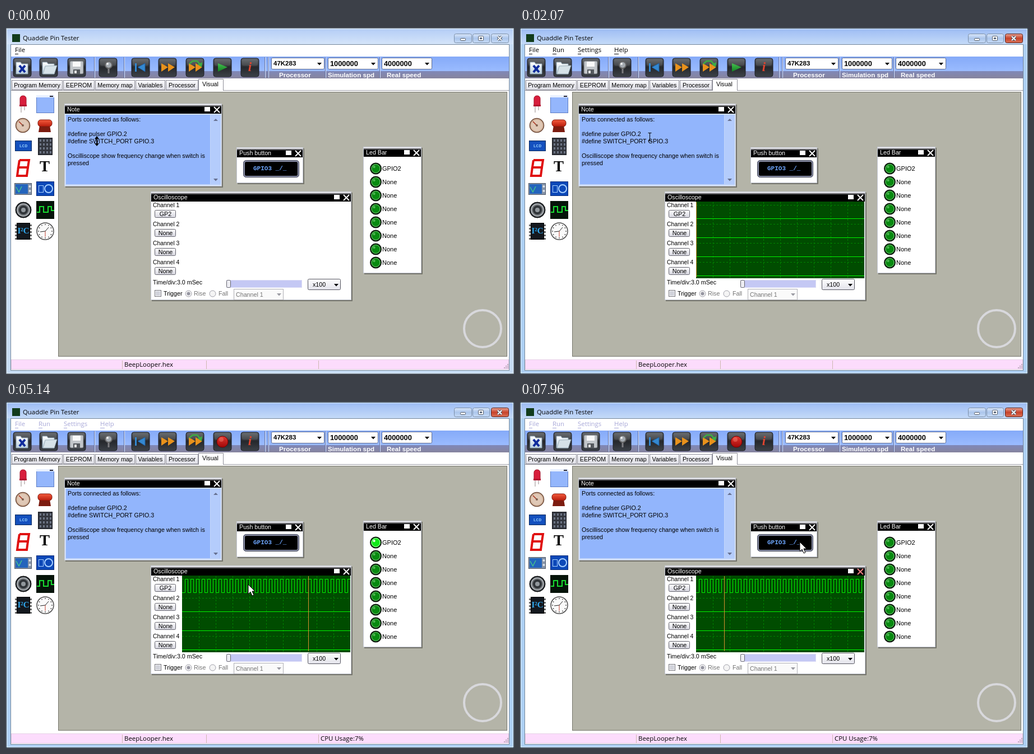
Recreate the animation shown at these times as an HTML page with a canvas. Size 906 by 618 pixels, loop 8000 ms.

```html
<!DOCTYPE html>
<html lang="en">
<head>
<meta charset="utf-8">
<title>Simulator session</title>
<style>
html, body { margin: 0; width: 100%; height: 100%; overflow: hidden; }
canvas { display: block; }
</style>
</head>
<body>
<canvas id="stage" width="906" height="618"></canvas>
<script>
const c = document.getElementById('stage').getContext('2d');
const LOOP = 8000;
const SANS = '10.7px "Liberation Sans", sans-serif';
const UI = '11.4px "Open Sans", sans-serif';
const BOLD = 'bold 11.6px "Liberation Sans", sans-serif';

// Pointer path: time, x, y
const POINTER = [
  [0, 162, 202], [520, 162, 202], [760, 113, 187], [1890, 113, 187], [2220, 320, 200],
  [2450, 300, 246], [2680, 212, 248], [2740, 212, 248], [3100, 388, 98], [3340, 389, 72],
  [3870, 389, 72], [4360, 484, 88], [4540, 666, 185], [4700, 640, 220], [5140, 432, 326],
  [5450, 470, 322], [5900, 605, 298], [6380, 500, 262], [6860, 474, 256], [7290, 474, 256], [7960, 499, 250]
];
// Oscilloscope sweep: time, refresh count
const SWEEP = [[3870, 0], [4360, 13], [5140, 33], [6860, 65], [7960, 86]];
const RUN_AT = 3870;

function sample(keys, t, ease) {
  let i = 1;
  while (i < keys.length - 1 && t > keys[i][0]) i++;
  const a = keys[i - 1], b = keys[i];
  let u = Math.min(1, Math.max(0, (t - a[0]) / (b[0] - a[0])));
  if (ease) u = u * u * (3 - 2 * u);
  return a.slice(1).map((v, k) => v + (b[k + 1] - v) * u);
}

function rect(x, y, w, h, fill, stroke) {
  if (fill) { c.fillStyle = fill; c.fillRect(x, y, w, h); }
  if (stroke) { c.strokeStyle = stroke; c.lineWidth = 1; c.strokeRect(x + .5, y + .5, w - 1, h - 1); }
}
function round(x, y, w, h, r, fill, stroke, width = 1) {
  c.beginPath(); c.roundRect(x, y, w, h, r); paint(fill, stroke, width);
}
function paint(fill, stroke, width = 1) {
  if (fill) { c.fillStyle = fill; c.fill(); }
  if (stroke) { c.strokeStyle = stroke; c.lineWidth = width; c.stroke(); }
}
function disc(x, y, r, fill, stroke, width) {
  c.beginPath(); c.arc(x, y, r, 0, 7); paint(fill, stroke, width);
}
function poly(points, fill, stroke, width) {
  c.beginPath();
  for (let i = 0; i < points.length; i += 2) c.lineTo(points[i], points[i + 1]);
  c.closePath(); paint(fill, stroke, width);
}
function line(points, stroke, width = 1, dash = []) {
  c.beginPath(); c.setLineDash(dash);
  for (let i = 0; i < points.length; i += 2) c.lineTo(points[i], points[i + 1]);
  paint(null, stroke, width); c.setLineDash([]);
}
function text(s, x, y, font = SANS, color = '#000', align = 'left') {
  c.font = font; c.fillStyle = color; c.textAlign = align; c.textBaseline = 'middle';
  c.fillText(s, x, y);
}
function fade(y0, y1, ...colors) {
  const g = c.createLinearGradient(0, y0, 0, y1);
  colors.forEach((k, i) => g.addColorStop(i / (colors.length - 1), k));
  return g;
}
const downArrow = (x, y, color) => poly([x - 4, y - 2, x + 4, y - 2, x, y + 2.5], color);
const play = (x, color, w = 12) => poly([x, 63, x + w, 70, x, 78], color);

function frame(t) {
  const active = t >= 1020;
  rect(0, 0, 906, 618, active ? '#aed0f4' : '#c6dcf4');
  rect(1, 1, 904, 28, fade(1, 29, active ? '#9dbcf4' : '#b4cdf6', active ? '#c4daf8' : '#d4e4f9'));
  rect(0, 0, 906, 618, null, active ? '#26384c' : '#707c8a');
  rect(1, 1, 904, 616, null, '#e4f2ff');
  rect(11, 11, 14, 14, '#123c1c');
  text('Quaddle Pin Tester', 30, 19, UI);
  [[799, 31], [832, 30], [865, 31]].forEach(([x, w], i) => {
    const red = i === 2 && active;
    round(x + .5, 10.5, w, 16, 3, red ? fade(10, 27, '#e9a99b', '#c8432a', '#d9745a') : fade(10, 27, '#dce8fa', '#acc6ec', '#c8dcf6'), red ? '#5a2018' : '#7b8fa8');
  });
  round(810.5, 18.5, 9, 4, 1, '#fff', '#4d5868');
  round(842.5, 14.5, 9, 8, 1, '#fff', '#4d5868');
  rect(845, 17, 4, 3, '#8fa4bd', '#4d5868');
  for (const [k, w] of [['#4d5868', 4], ['#fff', 2]]) {
    line([877, 15, 884, 22], k, w); line([884, 15, 877, 22], k, w);
  }

  rect(8, 29, 890, 583, '#fff', '#74869a');
  const menuColor = t >= RUN_AT ? '#a8a8d8' : '#000';
  [['File', 16, 6], ['Run', 58, 7], ['Settings', 103, 6], ['Help', 168, 8]].forEach(([s, x, w], i) => {
    if (i && t < 60) return;
    text(s, x, 40, UI, menuColor);
    rect(x, 46, w, 1, menuColor);
  });
  toolbar(t);
  tabs();
  palette();
  workspace(t);
  rect(9, 592, 888, 18, '#fcdcfc', '#e6d0e6');
  for (const x of [207, 357, 557]) rect(x, 594, 1, 15, '#cdb8b0');
  text('BeepLooper.hex', 211, 602, UI);
  if (t >= 4720) text(`CPU Usage:${t >= 5720 && t < 6720 ? 8 : 7}%`, 561, 602, UI);
  for (let i = 0; i < 6; i++) {
    const col = [0, 1, 2, 1, 2, 2][i], row = [2, 1, 0, 2, 1, 2][i];
    rect(888 + col * 3, 600 + row * 3, 2, 2, '#b8a4b8');
  }

  const age = t - (t < 3000 ? 1020 : RUN_AT);
  if (age >= 0 && age < 540) clickRings(...(t < 3000 ? [113, 187] : [383, 74]), age);
  pointer(t);
}

function toolbar(t) {
  rect(9, 51, 888, 27, fade(51, 78, '#85aaf8', '#9bbcff'));
  rect(9, 77, 888, 13, fade(77, 90, '#8088b8', '#86849e'));
  for (const x of [157, 210, 461, 467, 569, 666]) { rect(x, 52, 1, 37, '#5f70a0'); rect(x + 1, 52, 1, 37, '#dce6ff'); }
  const xs = [29, 76, 126, 182, 240, 288, 337, 386, 435];
  xs.forEach(x => {
    round(x - 16, 54, 32, 33, 4, fade(54, 87, '#5c6064', '#26282c', '#3c4148'), '#1c1e24');
    round(x - 14, 55.5, 28, 12, 3, 'rgba(255,255,255,.1)');
  });
  for (const x of [18, 65]) {
    poly([x, 61, x + 8, 61, x + 10, 64, x + 21, 64, x + 21, 82, x, 82], fade(61, 82, '#fff', '#b9d0df'), '#8fa5b5');
  }
  line([24, 67, 34, 79], '#102c9c', 4); line([34, 67, 24, 79], '#102c9c', 4);
  poly([66, 82, 70, 68, 91, 67, 86, 82], '#d6e2e8', '#9cafba');
  round(114, 59, 24, 23, 2, '#c2c6ca', '#686c70');
  rect(119, 60, 14, 9, '#f9f9f9'); rect(120, 74, 12, 8, '#55595e'); rect(122, 76, 4, 5, '#e8e8e8');
  line([183, 72, 183, 81], '#7c7c80', 3);
  disc(183, 66, 6, '#a4aab0', '#666', 2);
  disc(181, 64, 2, '#eee');
  rect(230, 63, 3, 15, '#3488d0');
  poly([248, 63, 235, 70, 248, 78], '#3488d0', '#1e5c9c');
  play(277, '#e8921c'); play(289, '#e8921c');
  play(326, '#e8921c'); play(338, '#e8921c');
  line([327, 64, 333, 59, 341, 59, 346, 65], '#3cae44', 2.5);
  poly([342, 65, 350, 61, 349, 70], '#3cae44');
  if (t < RUN_AT) play(378, fade(62, 79, '#48c452', '#107c20'), 17);
  else { disc(386, 71, 10, fade(61, 81, '#e43830', '#a00808'), '#700'); disc(384, 67, 4, 'rgba(255,160,140,.35)'); }
  text('i', 435, 71, 'italic bold 23px "Liberation Serif", serif', '#e0452f', 'center');
  [[473, 94, '47K283', 'Processor', 487], [574, 89, '1000000', 'Simulation spd', 574], [670, 89, '4000000', 'Real speed', 679]].forEach(([x, w, value, label, lx], i) => {
    round(x + .5, 53.5, w, 20, 2, '#fff', '#5b6a90');
    text(value, x + 4, 64, `bold ${i ? 12.8 : 11.5}px "Liberation Sans", sans-serif`);
    downArrow(x + w - 8, 64, '#000');
    text(label, lx, 85, BOLD, '#fff');
  });
}

function tabs() {
  rect(9, 90, 888, 22, '#fff');
  [['Program Memory', 10, 91], ['EEPROM', 102, 56], ['Memory map', 159, 71], ['Variables', 231, 53], ['Processor', 285, 58]].forEach(([s, x, w]) => {
    rect(x, 93, w, 18, fade(93, 111, '#fbfbfd', '#dcdce4'), '#8d8d98');
    text(s, x + w / 2, 103, SANS, '#000', 'center');
  });
  rect(9, 111, 888, 1, '#9c9ca4');
  rect(343, 91, 45, 21, '#fff');
  line([343.5, 112, 343.5, 91.5, 387.5, 91.5, 387.5, 112], '#8d8d98');
  text('Visual', 350, 101);
}

function palette() {
  rect(9, 112, 84, 479, '#fff');
  line([27, 138, 27, 151], '#b8b0b0', 1.5); line([33, 138, 33, 147], '#b8b0b0', 1.5);
  round(25, 121, 11, 18, [5, 5, 1, 1], '#d81e3c', '#a01028'); rect(24, 137, 13, 3, '#b41430');
  rect(54, 120, 32, 32, '#94b6fc', '#5c7cc4'); rect(54, 120, 32, 4, '#e8f0ff'); rect(78, 121, 6, 2, '#223');
  disc(30, 174, 12.5, '#d3b49c', '#6e4a38', 1.5);
  disc(30, 174, 10, '#dfc8b6'); line([30, 174, 23, 167], '#a8301c', 1.5); disc(30, 174, 2, '#80604e');
  poly([60, 174, 78, 174, 80, 186, 58, 186], '#7c1c10');
  round(57, 164, 25, 12, 5, fade(164, 176, '#f45a3c', '#b81c0c'), '#80180c');
  rect(16, 201, 30, 19, '#1450b4', '#0a2864'); rect(19, 204, 24, 13, '#1450c0');
  text('LCD', 31, 211, 'bold 8px "Liberation Mono", monospace', '#8cc8f8', 'center');
  rect(57, 196, 26, 31, '#33363e', '#1a1c22');
  for (let i = 0; i < 16; i++) rect(60 + i % 4 * 6, 199 + (i >> 2) * 7, 3, 4, '#6c7484');
  // Seven-segment digit, slightly slanted
  line([24, 236, 41, 236, 39, 249, 22, 249, 24, 236], '#e01010', 4);
  line([22, 249, 20, 264, 37, 264, 39, 249], '#e01010', 4);
  text('T', 69, 249, 'bold 27px "Liberation Serif", serif', '#000', 'center');
  rect(15, 277, 31, 21, '#8794a8', '#4e5868'); rect(17, 279, 22, 17, '#2464bc');
  line([18, 284, 23, 293, 28, 283], '#46c48c', 1.5);
  disc(42.5, 283, 2, '#dfe4ea'); disc(42.5, 291, 2, '#dfe4ea');
  rect(54, 274, 32, 26, '#0c48b8', '#082c78');
  rect(58, 281, 9, 13, null, '#a8d0ff'); disc(76, 287, 7, null, '#a8d0ff', 2);
  disc(31, 325, 14, '#24282c', '#111'); disc(31, 325, 11, '#74787c', '#b8bcc0', 1.5);
  disc(31, 325, 8, '#303438'); disc(31, 325, 4, '#91979c');
  rect(54, 309, 32, 32, '#06140a');
  line([55, 329, 60, 329, 60, 319, 67, 319, 67, 329, 75, 329, 75, 319, 81, 319, 81, 326, 86, 326], '#18dc30', 2);
  for (let i = 0; i < 5; i++) rect(16, 351 + i * 6, 30, 3, '#6c6c6c');
  rect(19, 348, 24, 30, '#14181e', '#000');
  text('I²C', 31, 363, 'bold 15px "Liberation Serif", serif', '#30a8ee', 'center');
  disc(70, 363, 15, '#fafafa', '#4c4c4c', 1.5);
  for (let i = 0; i < 12; i++) {
    const a = i * Math.PI / 6;
    disc(70 + 12 * Math.cos(a), 363 + 12 * Math.sin(a), .9, '#444');
  }
  line([61, 364, 70, 363, 76, 356], '#222'); line([70, 363, 70, 373], '#c04030');
}

function panel(title, x, y, w, h, hot) {
  rect(x + 2, y + 2, w, h, 'rgba(40,40,35,.45)');
  rect(x, y, w, h, '#fff', '#c4c8d4');
  rect(x + 1, y + 2, w - 2, 16, fade(y + 2, y + 6, '#d8d8e0', '#000'));
  text(title, x + 5, y + 11, SANS, '#fff');
  const r = x + w, cross = hot ? '#f08080' : '#fff';
  rect(r - 31, y + 6, 10, 8, '#fff');
  line([r - 14, y + 6, r - 4, y + 16], cross, 2);
  line([r - 4, y + 6, r - 14, y + 16], cross, 2);
}

function workspace(t) {
  rect(93, 114, 801, 473, '#b4b4a8', '#77776e');
  disc(850, 537, 33, null, '#d8d8dc', 4);

  panel('Note', 104, 135, 281, 148);
  rect(105, 153, 279, 129, '#c4d6fa', '#dce8ff');
  rect(107, 155, 257, 124, '#92b5fc');
  rect(365, 155, 18, 124, '#b4ccfc');
  poly([370, 166, 378, 166, 374, 162], '#667090'); downArrow(374, 271, '#667090');
  ['Ports connected as follows:', '', '#define pulser GPIO.2', '#define SWITCH_PORT GPIO.3', '', 'Oscilliscope show frequency change when switch is', 'pressed']
    .forEach((s, i) => text(s, 110, 164 + i * 13));
  if (t > 2220 && (t + 60) % 1060 < 530) rect(266, 196, 1, 13, '#000');

  panel('Push button', 411, 213, 119, 64);
  round(424.5, 237.5, 97, 28, 4, '#000', '#8c90a8', 3);
  round(423.5, 236.5, 99, 30, 5, null, '#3c4050');
  text('GPIO3 _/_', 441, 251, 'bold 11px "Liberation Mono", monospace', '#6ca4fc');

  const step = t < RUN_AT ? -1 : Math.floor(sample(SWEEP, t)[0] + 1e-6);
  panel('Led Bar', 637, 212, 104, 226);
  for (let i = 0; i < 8; i++) {
    const y = 251 + i * 24, lit = i === 0 && step >= 0 && step % 3 === 0;
    disc(659.5, y, 9.5, lit ? '#10e818' : '#088a10', '#101810', 2);
    disc(659.5, y, 7.5, null, lit ? '#b0ffb0' : '#78bc78', 1);
    disc(656.5, y - 3, 2.2, lit ? '#d8ffd8' : '#4cb450');
    text(i ? 'None' : 'GPIO2', 671, y + 1, '11px "Liberation Sans", sans-serif');
  }
  oscilloscope(t, step);
}

function oscilloscope(t, step) {
  panel('Oscilloscope', 258, 292, 358, 194, t >= 5900);
  for (let i = 0; i < 4; i++) {
    const y = 317 + i * 34;
    text('Channel ' + (i + 1), 262, y, '10.4px "Liberation Sans", sans-serif');
    round(265.5, y + 8.5, 37, 13, 2, fade(y + 8, y + 22, '#fff', '#d4d4de'), '#62626c');
    text(i ? 'None' : 'GP2', 284.5, y + 16, SANS, '#000', 'center');
  }
  if (t >= 60) scope(step);
  text('Time/div:3.0 mSec', 262, 455);
  rect(393, 450, 135, 14, '#c4c8f4', '#dcdcf6');
  round(393.5, 450.5, 7, 13, 2, '#eeeef4', '#62626c');
  round(538.5, 448.5, 58, 19, 2, fade(448, 468, '#fff', '#e2e2ea'), '#55555f');
  text('x100', 547, 459); downArrow(589, 459, '#000');
  rect(265, 468, 12, 12, '#f8f8f8', '#74747c'); rect(267, 470, 8, 8, '#d0d2da');
  text('Trigger', 281, 475);
  [[325, 'Rise', 335], [368, 'Fall', 379]].forEach(([x, s, tx], i) => {
    disc(x + .5, 474.5, 5.5, '#f4f4f4', '#9c9ca6');
    if (!i) disc(x + .5, 474.5, 3, '#9494a0');
    text(s, tx, 475, SANS, '#747474');
  });
  rect(406, 466, 89, 20, '#fafafa', '#b0b0b6');
  text('Channel 1', 410, 477, SANS, '#747474'); downArrow(487, 476, '#9a9aa2');
}

function scope(step) {
  const L = 314, W = 300, scan = Math.max(0, step) % 12 * 25;
  rect(L, 310, W, 137, '#004c00');
  for (let x = L + 30.5; x < L + W; x += 30) line([x, 311, x, 446], '#008400', 1, [3, 3]);
  for (let i = 0; i < 4; i++) {
    line([L, 316.5 + i * 34, L + W, 316.5 + i * 34], '#008400', 1, [3, 3]);
    const y = [340.5, 374.5, 408.5, 442.5][i];
    if (i || step < 12) line([L, y, L + W, y], '#00f400', 1);
  }
  if (step >= 0) {
    const end = step < 12 ? scan : W, points = [L, 340.5];
    for (let x = 5; x < end; x += 10) {
      const a = L + x + .5, b = a + 5;
      points.push(a, 340.5, a, 316.5, b, 316.5, b, 340.5);
    }
    points.push(L + end, 340.5);
    c.save(); c.beginPath(); c.rect(L, 310, end, 137); c.clip();
    rect(L, 340, end, 1, '#004c00');
    line(points, '#00f400');
    c.restore();
  }
  rect(L + scan, 311, 1, 134, '#d89030');
}

function clickRings(x, y, age) {
  const r = 23 * Math.min(1, .25 + age / 400);
  for (const k of [r, r - 6, r - 12]) if (k > 0) disc(x, y, k, null, '#f01414', 2);
}

function pointer(t) {
  const [x, y] = sample(POINTER, t, true);
  if (t < 520) {
    line([x, y - 8, x, y + 8], '#000', 1.5);
    poly([x, y - 9, x + 4, y - 4, x - 4, y - 4], '#000');
    poly([x, y + 9, x + 4, y + 4, x - 4, y + 4], '#000');
  } else if (x > 107 && x < 364 && y > 154 && y < 279) {
    line([x, y - 7, x, y + 7], '#000');
    for (const d of [-7, 7]) line([x - 3, y + d, x + 3, y + d], '#000');
  } else {
    poly([0, 0, 0, 17, 4, 13, 7, 20, 10, 19, 7, 12, 12, 12].map((v, i) => v + (i % 2 ? y : x)), '#fff', '#000', 1);
  }
}

function tick(now) {
  frame(now % LOOP);
  requestAnimationFrame(tick);
}
requestAnimationFrame(tick);
</script>
</body>
</html>
```
